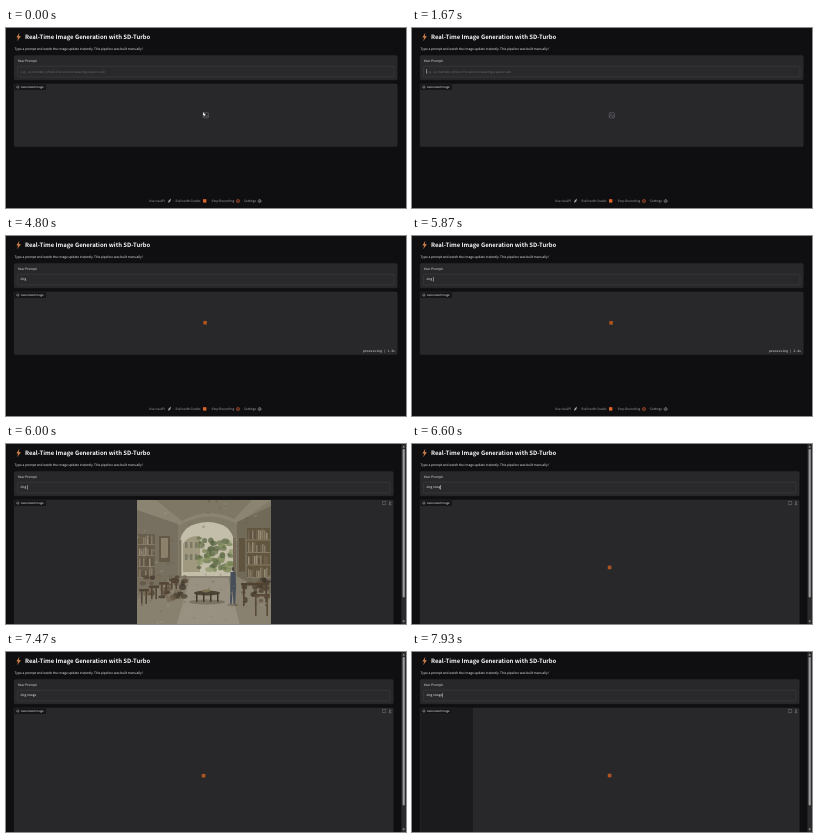
Recreate the animation shown at these times as an HTML page. Size 400 by 180 pixels, loop 8000 ms.

```html
<!DOCTYPE html>
<html lang="en">
<head>
<meta charset="utf-8">
<title>Real-Time Image Generation</title>
<style>
  html, body { margin: 0; width: 100%; height: 100%; overflow: hidden; background: #0f0f11; }
  svg { display: block; width: 100%; height: 100%; }
  text {
    font-family: "Noto Sans CJK JP", "Noto Sans CJK SC", "Noto Sans CJK", "Open Sans", sans-serif;
    fill: #ececef; white-space: pre; text-rendering: geometricPrecision;
  }
  .mono { font-family: "Noto Sans Mono", "Liberation Mono", monospace; }
  .panel { fill: #28282b; stroke: #39393e; stroke-width: .3; }
  .foot text { font-size: 3.2px; fill: #a1a1aa; }
  .line { fill: none; stroke: #a1a1aa; stroke-width: .45; }
</style>
</head>
<body>
<svg viewBox="0 0 400 180" preserveAspectRatio="none">
  <defs>
    <linearGradient id="wall" x2="0" y2="1">
      <stop offset="0" stop-color="#7f7967"/><stop offset=".5" stop-color="#857e6c"/><stop offset="1" stop-color="#767060"/>
    </linearGradient>
    <linearGradient id="glow" x2="0" y2="1">
      <stop offset="0" stop-color="#a0967f"/><stop offset="1" stop-color="#b3aa94"/>
    </linearGradient>
    <clipPath id="square"><rect x="131" y="56" width="134" height="134"/></clipPath>
    <filter id="soft" x="0" y="0" width="1" height="1"><feGaussianBlur stdDeviation=".65"/></filter>
  </defs>
  <rect width="400" height="180" fill="#0f0f11"/>

  <path d="M13.4 4.8 10.4 9.5h2L11 13.2 14.9 8.2h-2.2z" fill="#dd8a50"/>
  <text x="19" y="11.4" font-size="5.93" font-weight="700" style="fill:#fafafa">Real-Time Image Generation with SD-Turbo</text>
  <text x="8.5" y="21.6" font-size="3.2" font-weight="500">Type a prompt and watch the image update instantly. This pipeline was built manually!</text>

  <rect id="promptBox" class="panel" x="8.2" y="27.6" width="383" height="24.2" rx="1"/>
  <text x="11.8" y="34.4" font-size="3.25">Your Prompt</text>
  <rect id="field" x="11.6" y="38.2" width="376.4" height="10.8" rx=".8" fill="#29292c" stroke="#4a4a50" stroke-width=".4"/>
  <text id="hint" x="14.6" y="44.5" font-size="3.24" style="fill:#68686f">e.g., a cinematic photo of a raccoon wearing a space suit</text>
  <text id="typed" x="14.6" y="44.4" font-size="3.2" font-weight="500"></text>
  <rect id="caret" y="41" width=".45" height="4.6" fill="#e4e4e7"/>

  <rect id="imageBox" class="panel" x="8.2" y="56" width="383" height="62.6" rx="1"/>
  <rect id="shade" x="8.6" y="56.2" width="52.4" height="130" fill="#1b1b1e"/>
  <g id="picture" clip-path="url(#square)">
    <g id="cafe" filter="url(#soft)"></g>
    <g id="library" filter="url(#soft)"></g>
  </g>
  <g id="emptyIcon" class="line" stroke-opacity=".7">
    <rect x="197.2" y="84.7" width="5.2" height="5.2" rx=".6"/>
    <path d="M197.4 88.8 199.2 87l2.4 2.6M200.4 88.2l.8-.8 1.1 1"/><circle cx="199" cy="86.2" r=".35"/>
  </g>
  <rect id="loader" width="3.6" height="3.6" fill="#ad531f"/>
  <text id="status" class="mono" x="389" y="116" font-size="3.14" text-anchor="end"></text>
  <path d="M8.3 56.1H40.3V61.4q0 .9-.9.9H8.3z" fill="#151517" stroke="#39393e" stroke-width=".3"/>
  <g class="line"><rect x="10.8" y="57.9" width="2.2" height="2.2" rx=".3"/><path d="M10.9 59.8l.9-.9 1 1"/></g>
  <text x="15.1" y="60.2" font-size="2.84" font-weight="500">Generated Image</text>

  <g id="footer" class="foot">
    <text x="143" y="174.2">Use via API</text>
    <path d="M162 174.4l.6-1.8 2.4-2-.7 2.8-1.5 1z" fill="#a1a1aa"/>
    <text x="167" y="174.2">·</text>
    <text x="169.6" y="174.2">Built with Gradio</text>
    <rect x="197" y="171.2" width="3.4" height="3.4" fill="#d9662b"/>
    <text x="202.6" y="174.2">·</text>
    <text x="205.6" y="174.2">Stop Recording</text>
    <circle cx="232" cy="173" r="1.6" fill="none" stroke="#c4562a" stroke-width=".6"/>
    <circle cx="232" cy="173" r=".7" fill="#c4562a"/>
    <text x="235.4" y="174.2">·</text>
    <text x="238" y="174.2">Settings</text>
    <g class="line"><circle cx="253.6" cy="173" r="1.5" stroke-dasharray=".8 .38" stroke-width=".8"/><circle cx="253.6" cy="173" r=".9"/></g>
  </g>

  <g id="tall">
    <g class="line"><path d="M376.6 58.6v-1.2h1.2M378.4 57.4h1.2v1.2M379.6 59.4v1.2h-1.2M377.8 60.6h-1.2v-1.2M384 57v2.4M382.9 58.5l1.1 1.1 1.1-1.1M382.6 60.7h2.8"/></g>
    <rect x="395.4" width="4.6" height="180" fill="#2b2b2d"/>
    <rect x="396.6" y="5" width="2.2" height="148.5" rx="1.1" fill="#9b9b9d"/>
    <path d="M396.4 3.4l1.3-1.8 1.3 1.8zM396.4 176.6l1.3 1.8 1.3-1.8z" fill="#9b9b9d"/>
  </g>
  <path id="pointer" d="M0 0v4l1-.9.7 1.5.7-.3-.7-1.4h1.2z" fill="#fff" stroke="#222" stroke-width=".2"/>
</svg>
<script>
const LOOP = 8000, FOCUS = 600, START = 3470, TALL = 5930;
const KEYS = [[3470, "d"], [3670, "o"], [4270, "g"], [5600, " "], [6150, "i"], [6290, "m"],
  [6420, "a"], [6560, "g"], [6690, "e"]];
// start of each flash, start and end of its fade, scene shown
const FLASHES = [[5930, 6070, 6190, "cafe"], [6800, 6930, 7060, "library"], [7730, 7810, 7900, "library"]];

const $ = id => document.getElementById(id);
const set = (id, attrs) => { for (const k in attrs) $(id).setAttribute(k, attrs[k]); };
const show = (id, on) => { $(id).style.display = on ? "" : "none"; };
const clamp = v => Math.max(0, Math.min(1, v));

let seed = 7;
const rnd = (a = 0, b = 1) => {
  seed = (seed * 16807) % 2147483647;
  return a + (b - a) * seed / 2147483647;
};
const pick = list => list[Math.floor(rnd(0, list.length))];
const rect = (x, y, w, h, fill, o = 1) => `<rect x="${x}" y="${y}" width="${w}" height="${h}" fill="${fill}" opacity="${o}"/>`;
const path = (d, fill, o = 1) => `<path d="${d}" fill="${fill}" opacity="${o}"/>`;
const oval = (x, y, rx, ry, fill, o = 1) => `<ellipse cx="${x}" cy="${y}" rx="${rx}" ry="${ry}" fill="${fill}" opacity="${o}"/>`;
const many = (n, draw) => Array.from({ length: n }, (_, i) => draw(i)).join("");
const dabs = (n, x, y, w, h, colors, size, o) => many(n, () =>
  oval(rnd(x, x + w), rnd(y, y + h), rnd(size / 2, size), rnd(size / 3, size * .8), pick(colors), o));

function shelves(x, y, w, h, rows, back, colors) {
  const step = h / rows;
  let out = rect(x, y, w, h, back);
  for (let r = 0; r < rows; r++) {
    const base = y + (r + 1) * step;
    for (let bx = x + 1; bx < x + w - 2; bx += 2) {
      const bh = step * rnd(.5, .8);
      out += rect(bx, base - bh - 1, 1.5, bh, pick(colors));
    }
    out += rect(x, base - 1, w, 1, colors[0]);
  }
  return out;
}

function table(x, y, w, h, fill) {
  return rect(x, y, w, 2.4, fill) + rect(x + 2, y, 1.6, h, fill) + rect(x + w - 3.6, y, 1.6, h, fill);
}

function cafe() {
  const wood = ["#857a65", "#6f634f", "#5f5444", "#968b75"];
  return rect(131, 56, 134, 134, "url(#wall)")
    + path("M131 56H265L231 80Q202 64 172 82L131 66z", "#8b8472")
    + path("M150 56H246L228 75Q202 62 176 77z", "#797260", .7)
    + path("M131 66 172 80V136L131 152z", "#777060")
    + path("M265 62 231 78V134L265 152z", "#726a59")
    + path("M131 156 174 132H230L265 150V190H131z", "#888170")
    + path("M168 190 184 134H222L236 190z", "#a49c8a", .6)
    + path("M174 132V98Q176 79 202 78Q226 79 228 98V132z", "#c3bea9")
    + path("M177 128V100Q182 91 194 92V128z", "#a0987f")
    + many(6, i => rect(179 + i % 3 * 5, 98 + (i > 2) * 12, 2.4, 6, "#7a7a66"))
    + dabs(60, 193, 94, 33, 32, ["#657048", "#73804f", "#566240", "#8a9466"], 4, .7)
    + rect(173, 96, 2.4, 38, "#7b7260") + rect(227, 94, 3, 42, "#766c59")
    + shelves(132, 90, 17, 44, 4, "#675d4c", wood) + rect(153, 92, 11, 26, "#645947")
    + rect(155, 94, 7, 20, "#8b8069")
    + shelves(241, 84, 23, 50, 4, "#62563f", wood) + rect(233, 94, 6, 34, "#60543f")
    + dabs(36, 133, 132, 46, 24, ["#4d4131", "#635341", "#3f362a", "#786a55"], 4, .75)
    + many(4, i => table(133 + i * 10, 145 - i * 3.4, 10, 15 - i * 1.5, "#544636"))
    + dabs(22, 236, 136, 28, 24, ["#4b3e2f", "#62523f", "#3e352a"], 4, .7)
    + table(235, 139, 28, 23, "#4f4233") + table(247, 150, 17, 22, "#5a4b39")
    + oval(201, 158, 18, 2.4, "#5f5747", .5) + oval(201, 149, 13, 2.6, "#4d4335")
    + many(4, i => rect(190 + i * 7, 149, 1.5, 9, "#41382c"))
    + oval(200, 147, 4, 1.4, "#7d7050")
    + oval(227, 125, 1.4, 1.9, "#4c4a48") + path("M224.5 128h5l.6 14-1 18h-1.6l-.8-16-1 16h-1.6z", "#454e59")
    + oval(227, 161, 6, 1.2, "#5e574a", .5)
    + dabs(110, 131, 56, 134, 126, ["#a79f8b", "#5c5343", "#857c68"], 1.8, .3);
}

function dog(x, y, s, coat, patch) {
  return `<g transform="translate(${x} ${y}) scale(${s} ${Math.abs(s)})">`
    + path("M-12-18Q-4-22 7-18L9-8V5H6L4-7-7-7-8 5H-11L-13-8-18-15-17-17z", coat)
    + path("M5-17 7-27Q12-30 15-25L19-23 18-20 13-19 9-12z", coat)
    + path("M7-27Q4-23 7-19L10-25z", patch) + oval(-4, -16, 6, 3.4, patch) + "</g>";
}

function library() {
  const books = ["#6f5c46", "#8b7657", "#655341", "#775441", "#a08c6d", "#5d574a"];
  const coats = ["#514a43", "#7b6d5a", "#65696c", "#8c7154", "#474039", "#a09179"];
  return rect(131, 56, 134, 134, "#65563f")
    + path("M131 56H265V64Q200 50 131 64z", "#857660")
    + shelves(132, 66, 46, 58, 5, "#514433", books) + shelves(228, 62, 37, 72, 6, "#514433", books)
    + path("M181 120V86Q184 60 206 59Q227 60 229 86V120z", "#7b6d55")
    + path("M189 112V86Q191 67 206 66Q220 67 222 86V112z", "url(#glow)")
    + many(3, i => rect(197 + i * 8, 67, .8, 44, "#857a65"))
    + many(4, i => rect(189, 76 + i * 9, 33, .8, "#857a65"))
    + path("M131 142H265V190H131z", "#6f6454") + path("M156 190 180 146H226L232 190z", "#8b7e6a", .55)
    + many(11, i => {
      const x = 143 + i * 9.6, y = 97 + rnd(-4, 4), c = pick(coats);
      return oval(x, y, 1.8, 2.4, "#a68468") + path(`M${x - 4.5} ${y + 19}L${x - 3.6} ${y + 4}Q${x} ${y + 1} ${x + 3.6} ${y + 4}L${x + 4.5} ${y + 19}z`, c);
    })
    + rect(146, 117, 92, 3.6, "#96714f") + rect(149, 120.6, 86, 20, "#574333")
    + many(8, i => rect(153 + i * 10.6, 122, 2, 18, "#725640"))
    + many(9, i => rect(152 + i * 9.5, 115.2, 5, 1.9, i % 2 ? "#c2b495" : "#7a5541"))
    + dabs(24, 133, 132, 36, 22, ["#43372b", "#5f4a38", "#7c664c"], 4, .7)
    + table(218, 146, 26, 26, "#42362b") + rect(220, 149, 22, 8, "#4a3d30")
    + oval(196, 181, 34, 2, "#4c4338", .6)
    + dog(156, 178, -.72, "#37302a", "#4d4033")
    + dog(179, 177, .62, "#433930", "#6b5a46")
    + dog(202, 178, -.95, "#a89b85", "#3b332b")
    + path("M234 180Q232 162 241 153L240 143 244 137 251 138 254 144Q264 156 260 180z", "#7c5b3e")
    + path("M241 180Q238 163 246 152Q253 163 249 180z", "#ac9b82")
    + path("M240 143 242 136 245 141z", "#543a28")
    + dabs(130, 131, 56, 134, 126, ["#a4947a", "#43382d", "#86735a"], 1.8, .3);
}

$("cafe").innerHTML = cafe();
$("library").innerHTML = library();

function typing(t) {
  const done = KEYS.filter(k => k[0] <= t);
  const last = done.length ? done[done.length - 1][0] : FOCUS;
  $("typed").textContent = done.map(k => k[1]).join("");
  show("hint", !done.length);
  const end = done.length ? $("typed").getComputedTextLength() : -.3;
  set("caret", { x: 14.7 + end });
  show("caret", t >= FOCUS && (t - last) % 1060 < 530);
}

function layout(t) {
  const tall = t >= TALL, w = tall ? 379 : 383;
  set("promptBox", { width: w });
  set("field", { width: w - 6.6 });
  set("imageBox", { width: w, height: tall ? 130 : 62.6 });
  show("footer", !tall);
  show("tall", tall);
  show("shade", t >= 7900);
}

function output(t) {
  const flash = FLASHES.find(f => t >= f[0] && t < f[2]);
  const seen = flash ? 1 - clamp((t - flash[1]) / (flash[2] - flash[1])) : 0;
  set("picture", { opacity: seen });
  for (const id of ["cafe", "library"]) show(id, flash && flash[3] === id);
  const busy = t >= START, tall = t >= TALL;
  const bob = .4 * Math.max(0, Math.sin((t - START) / 160));
  show("emptyIcon", !busy);
  show("loader", busy);
  set("loader", { x: tall ? 195.8 : 197.3, y: (tall ? 121.9 : 85.3) - bob, opacity: 1 - seen });
  show("status", busy && !tall);
  $("status").textContent = `processing | ${(Math.floor((t - START) / 100) / 10).toFixed(1)}s`;
}

function draw(t) {
  const p = clamp((t - 70) / 130);
  set("pointer", { transform: `translate(${197 - 95 * p} ${84 - 41 * p})` });
  show("pointer", t < 200);
  layout(t);
  typing(t);
  output(t);
}

const begin = performance.now();
function tick() {
  draw((performance.now() - begin) % LOOP);
  requestAnimationFrame(tick);
}
tick();
</script>
</body>
</html>
```
